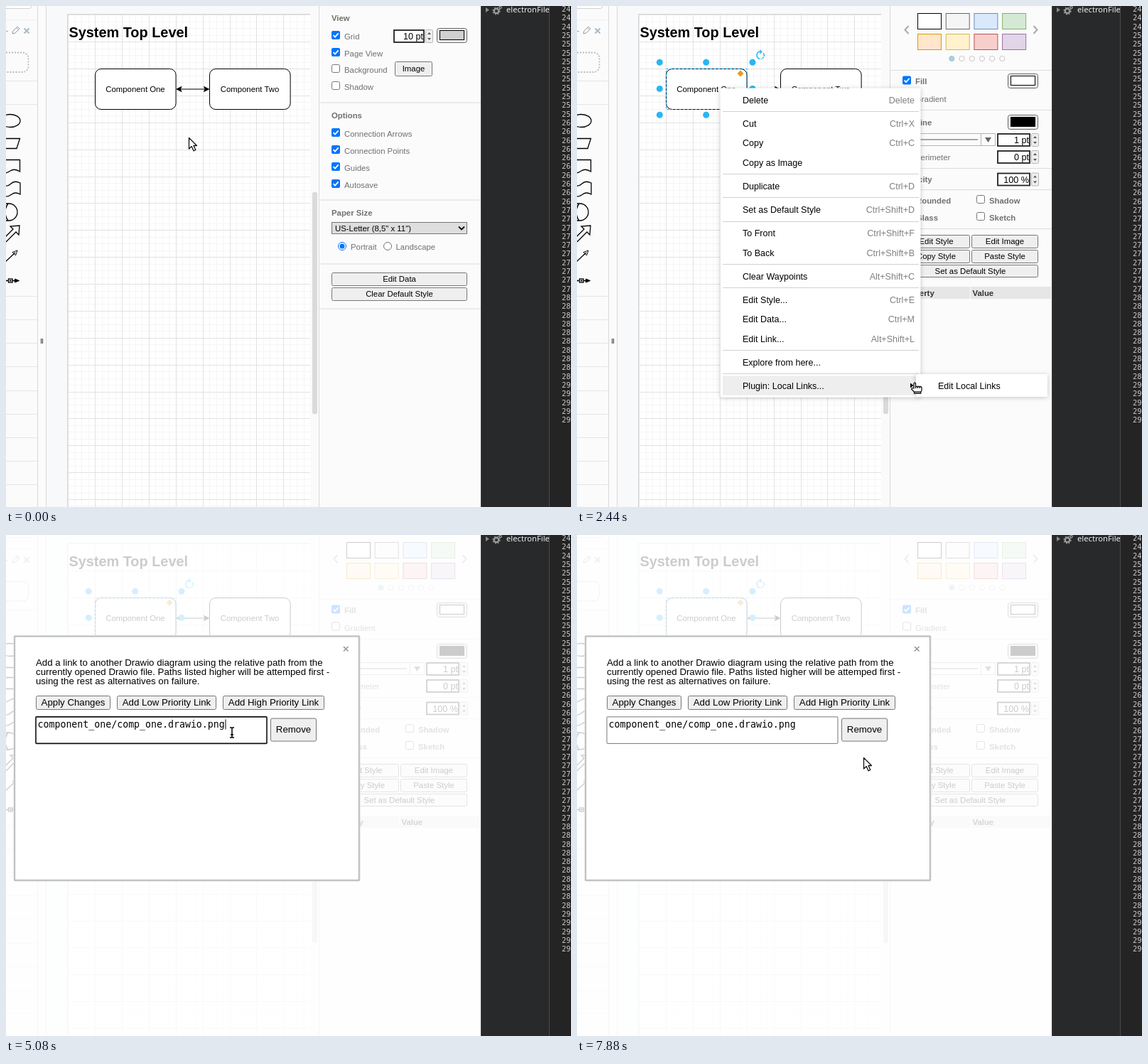
Animation of 795x705 px, one loop 8000 ms. Source, as an HTML page:

```html
<!DOCTYPE html>
<html lang="en">
<head>
<meta charset="utf-8">
<title>Local links</title>
<style>
  html, body { margin: 0; width: 100%; height: 100%; overflow: hidden; background: #fff; }
  svg { display: block; }
  text { font-family: "Liberation Sans", Arial, sans-serif; white-space: pre; }
  .mono { font-family: "DejaVu Sans Mono", monospace; }
  .ui { font-family: "Noto Sans", sans-serif; }
  .popup { filter: drop-shadow(0 1px 3px rgba(0, 0, 0, .22)); }
</style>
</head>
<body>
<svg id="stage" width="795" height="705" viewBox="0 0 795 705"></svg>
<script>
const LOOP = 8000, SMALL = 11.36, MENU = 12.52, INPUT = 12.6, BIG = 13.26, GREY = '#707070';

// Drawing helpers
const text = (x, y, s, o = {}) =>
  `<text x="${x}" y="${y}" font-size="${o.size || SMALL}" fill="${o.fill || '#000'}" class="${o.cls || ''}"
    font-weight="${o.bold ? 700 : 400}" text-anchor="${o.anchor || 'start'}">${s}</text>`;
const label = (x, y, s, bold) => text(x, y, s, { fill: GREY, bold });
const rect = (x, y, w, h, fill, stroke = 'none', r = 0, extra = '') =>
  `<rect x="${x}" y="${y}" width="${w}" height="${h}" fill="${fill}" stroke="${stroke}" rx="${r}" ${extra}/>`;
const path = (d, stroke = '#000', fill = 'none', extra = '') =>
  `<path d="${d}" stroke="${stroke}" fill="${fill}" ${extra}/>`;
const circle = (x, y, r, fill, stroke = 'none', extra = '') =>
  `<circle cx="${x}" cy="${y}" r="${r}" fill="${fill}" stroke="${stroke}" ${extra}/>`;
const group = (id, body) => `<g id="${id}">${body}</g>`;
const rule = y => path(`M441 ${y + .5}H668`, '#dcdcdc');
const check = (x, y, on) => on
  ? rect(x - 6, y - 6, 12, 12, '#0075ff', 'none', 2) + path(`M${x - 3.5} ${y}l2.5 2.7l4.7 -5.4`, '#fff', 'none', 'stroke-width="1.8"')
  : rect(x - 5.5, y - 5.5, 11, 11, '#fff', '#767676', 2);
const button = (x, y, w, h, s, size = SMALL) =>
  rect(x + .5, y + .5, w, h, '#efefef', '#767676', 2) +
  text(x + w / 2 + .5, y + h / 2 + size * .36, s, { size, anchor: 'middle' });
const spinner = (x, y, w, s) =>
  rect(x + 1, y + 1, w - 2, 17, '#fff', '#222', 0, 'stroke-width="1.8"') +
  text(x + w - 2, y + 14, s, { size: INPUT, anchor: 'end' }) +
  rect(x + w + 1.5, y + .5, 10, 18, '#efefef', '#b8b8b8', 1) +
  path(`M${x + w + 4} ${y + 7}l2.5 -3l2.5 3zM${x + w + 4} ${y + 12}l2.5 3l2.5 -3z`, 'none', '#555');
const swatchButton = (y, fill) =>
  rect(606.5, y + .5, 42, 20, '#efefef', '#666', 3) + rect(610.5, y + 3.5, 34, 13, fill, '#000');

function sidebar() {
  const ink = 'stroke-width="1.3"', line = d => path(d, '#000', 'none', ink);
  let s = rect(0, 0, 57, 705, '#fbfbfb') + path('M44.5 0V705M56.5 0V705', '#dadada');
  s += path('M-5 3.5H32Q36 3.5 36 -1', '#d0d0d0', '#fff') + path('M0 19.5H44', '#eee');
  s += path('M-3 35.5H3', '#aaa');
  s += path('M9 39l1 -4l6 -6l3 3l-6 6zM14.5 30.5l3 3', '#999');
  s += path('M25.5 31.5l7 7m0 -7l-7 7', '#a5bccb', 'none', 'stroke-width="2"');
  s += rect(-20, 65.5, 51.5, 27.5, 'none', '#bbb', 8, 'stroke-width="1.8" stroke-dasharray="2 2"');
  for (const y of [105, 138, 408, 441, 474, 507, 541, 574, 607, 640, 673]) s += path(`M0 ${y + .5}H44`, '#e5e5e5');
  s += path('M49.5 468v7M51.5 468v7', '#333');
  s += `<ellipse cx="6" cy="161.5" rx="14" ry="9" fill="none" stroke="#000" ${ink}/>`;
  s += line('M-2 186.5H19.5L15 200.5H-2') + line('M-2 216.5H19.5V233Q12 228 6 232T-4 235');
  s += line('M-4 252Q2 255 7 250T20 249V265Q13 261 8 265T-4 268');
  s += line('M-2 278H4A12 12 0 0 1 4 302H-2M3 278A20 20 0 0 0 3 302');
  s += line('M-3 327L10 314L6 310L19 309L18 322L14 318L0 332');
  s += line('M-2 361L13 347') + path('M16 344l-7 2.5l4.5 4.5z');
  s += path('M0 386.5H15', '#000', 'none', 'stroke-width="1.6"') + rect(3.5, 384, 5.5, 5, '#fff', '#000', 0, ink);
  return s + rect(5, 385.5, 2.5, 2, '#000') + path('M18.5 386.5l-6 -2.5v5z', '#000', '#000');
}

function canvas() {
  const step = 9.467, x0 = 87.3, y0 = 12.4;
  let minor = '', major = '';
  for (let i = 0; i < 74; i++) {
    const x = Math.round(x0 + i * step) + .5, y = Math.round(y0 + i * step) + .5;
    const d = `M87 ${y}H428` + (x < 428 ? `M${x} 12V705` : '');
    i % 4 ? minor += d : major += d;
  }
  const box = (x, s) => rect(x, 88.5, 113.6, 57, '#fff', '#000', 8.5) + text(x + 56.5, 121, s, { anchor: 'middle' });
  return rect(57, 0, 383, 705, '#f8f9fa') + rect(86.5, 11.5, 345, 700, '#fff', '#d8d8d8') +
    path(minor, '#f5f5f5') + path(major, '#e2e2e2') +
    text(88.4, 44, 'System Top Level', { size: 19.9, bold: true }) +
    box(125.5, 'Component One') + box(286.5, 'Component Two') +
    path('M244 117H282') + path('M240 117l7 -3.5l-1.7 3.5l1.7 3.5zM285.5 117l-7 -3.5l1.7 3.5l-1.7 3.5z', '#000', '#000') +
    rect(428, 0, 12, 705, '#fafafa') + rect(431, 262, 7, 312, '#d9dadc', 'none', 2);
}

function selection() {
  const blue = '#29b6f2';
  let s = rect(125.5, 88.5, 113.6, 57, 'none', '#00a8ff', 0, 'stroke-dasharray="2.8 2.8"');
  for (const x of [116.3, 181.7, 247]) for (const y of [79.2, 116.4, 153.3])
    if (x !== 181.7 || y !== 116.4) s += circle(x, y, 4.5, blue);
  s += path('M257.3 64.1A5.3 5.3 0 0 0 257.3 74.5', blue, 'none', 'stroke-width="1.5"');
  s += path('M263.2 68.5A5.3 5.3 0 0 1 258.7 74.5M263.2 68.5A5.3 5.3 0 0 0 262 66', blue, 'none', 'stroke-width="1.5" stroke-dasharray="2.5 1"');
  s += path('M257.3 61l3.5 3.5l-3.5 3.3z', 'none', blue);
  return s + path('M230 90.5l4.5 4.5l-4.5 4.5l-4.5 -4.5z', 'none', '#e69b1f');
}

function viewPanel() {
  let s = label(458, 21, 'View', 1);
  [['Grid', 41, 1], ['Page View', 65, 1], ['Background', 88, 0], ['Shadow', 112, 0],
   ['Connection Arrows', 178, 1], ['Connection Points', 202, 1], ['Guides', 226, 1], ['Autosave', 250, 1]]
    .forEach(([n, y, on]) => s += check(464, y, on) + label(476, y + 6.2, n));
  s += spinner(545, 33, 44, '10 pt') + swatchButton(31, '#d0d0d0') + button(547, 78, 52, 20, 'Image');
  s += [136, 273, 363, 426].map(y => rule(y - .5)).join('');
  s += label(458, 158, 'Options', 1) + label(458, 295, 'Paper Size', 1);
  s += rect(458.5, 304.5, 190, 16, '#dedede', '#767676') + text(463, 316.5, 'US-Letter (8,5" x 11")');
  s += path('M637 310.5l4 4l4 -4', '#000', 'none', 'stroke-width="1.8"');
  s += circle(473, 338, 5.5, '#fff', '#0075ff') + circle(473, 338, 3.5, '#0075ff') + label(485, 343, 'Portrait');
  s += circle(537, 338, 5.5, '#fff', '#767676') + label(548.5, 343, 'Landscape');
  return s + button(458, 375, 190, 18, 'Edit Data') + button(458, 396, 190, 18, 'Clear Default Style');
}

function stylePanel() {
  const tones = ['#fff #000', '#f5f5f5 #666', '#dae8fc #6c8ebf', '#d5e8d4 #82b366',
    '#ffe6cc #d79b00', '#fff2cc #d6b656', '#f8cecc #b85450', '#e1d5e7 #9673a6'];
  let s = tones.map((t, i) => rect(479.5 + i % 4 * 39.7, i < 4 ? 10.5 : 39.5, 33, 22, ...t.split(' '))).join('');
  s += path('M466.5 28l-5 5.5l5 5.5M642.5 28l5 5.5l-5 5.5', '#aaa', 'none', 'stroke-width="2"');
  for (let i = 0; i < 6; i++) s += circle(527.3 + i * 14.2, 74, 3.6, i ? '#fff' : '#a8d0e2', i ? '#c4c4c4' : '#9cc4d6');
  s += [90, 146, 228, 258, 313].map(rule).join('');
  s += check(464, 104.5, 1) + label(476, 110, 'Fill', 1) + swatchButton(95, '#fff');
  s += check(464, 128.5, 0) + label(476, 134.5, 'Gradient');
  s += check(464, 163, 1) + label(476, 168, 'Line', 1) + swatchButton(153, '#000');
  s += rect(458.5, 179.5, 130, 17, '#fbfbfb', '#b5b5b5') + path('M463 188H564', '#555') + path('M568.5 180V196', '#b5b5b5');
  s += path('M574 185h9l-4.5 7z', 'none', '#666');
  s += spinner(591, 179, 47, '1 pt') + spinner(591, 203, 47, '0 pt') + spinner(591, 234.5, 47, '100 %');
  s += label(476, 217, 'Perimeter') + label(458, 247.5, 'Opacity', 1);
  [['Rounded', 464, 272], ['Shadow', 568, 272], ['Glass', 464, 296], ['Sketch', 568, 296]]
    .forEach(([n, x, y]) => s += check(x, y, 0) + label(x + (x < 500 ? 13 : 12), y + 6, n, 1));
  s += button(458, 322, 94, 18, 'Edit Style') + button(555, 322, 93, 18, 'Edit Image');
  s += button(458, 343, 94, 18, 'Copy Style') + button(555, 343, 93, 18, 'Paste Style');
  s += button(458, 364, 190, 17, 'Set as Default Style');
  s += rect(441, 395, 226, 17, '#e6e6e6') + path('M553.5 395V412', '#fbfbfb');
  return s + text(456, 407.5, 'Property', { bold: 1, fill: '#333' }) + text(556.5, 407.5, 'Value', { bold: 1, fill: '#333' });
}

function devtools() {
  const icon = '#9a9a9a';
  let s = rect(668, 0, 127, 705, '#28292b') + rect(764, 0, 31, 705, '#242424') +
    path('M764.5 0V705', '#4a4a4d') + path('M668.5 0V705', '#3a3a3c');
  s += path('M675 2l5 3.5l-5 3.5z', 'none', '#8a8a8a');
  s += circle(690, 7, 3.2, 'none', icon, 'stroke-width="2.2"') +
    circle(690, 7, 4.8, 'none', icon, 'stroke-width="1.6" stroke-dasharray="1.9 1.87"');
  s += circle(695.5, 2, 1.6, 'none', icon, 'stroke-width="1.4"');
  s += `<svg width="764" height="20">${text(704, 9, 'electronFile', { size: 11.2, fill: '#e8eaed', cls: 'ui' })}</svg>`;
  for (let i = 0; i < 48; i++)
    s += text(782, 8 + i * 12.3, 247 + i, { size: 10.42, fill: '#c9c9c9', cls: 'mono' });
  return s;
}

const items = [[132, 'Delete', 'Delete'], [165, 'Cut', 'Ctrl+X'], [192.5, 'Copy', 'Ctrl+C'], [220, 'Copy as Image', ''],
  [253, 'Duplicate', 'Ctrl+D'], [286, 'Set as Default Style', 'Ctrl+Shift+D'], [319.5, 'To Front', 'Ctrl+Shift+F'],
  [347, 'To Back', 'Ctrl+Shift+B'], [380, 'Clear Waypoints', 'Alt+Shift+C'], [413, 'Edit Style...', 'Ctrl+E'],
  [440.5, 'Edit Data...', 'Ctrl+M'], [468, 'Edit Link...', 'Alt+Shift+L'], [501, 'Explore from here...', ''],
  [534, 'Plugin: Local Links...', '']];

function menu() {
  let s = rect(201.5, 115.5, 282, 435, '#fff', 'none', 2, 'class="popup"') +
    rect(205, 118, 74, 27.5, '#eee', 'none', 0, 'id="trail"') + rect(205, 0, 273, 27.5, '#eee', 'none', 0, 'id="rowHi"');
  items.forEach(([y, name, key], i) => {
    s += text(233, y + 4.5, name, { size: MENU }) + text(475, y + 4.5, key, { size: MENU, fill: '#808080', anchor: 'end' });
    if (i && y - items[i - 1][0] > 30) s += path(`M205 ${Math.round(y - 17) + .5}H481`, '#d0d0d0');
  });
  return s + path('M469 530.5l4.5 3.5l-4.5 3.5z', 'none', '#000');
}

const submenu = () => rect(477, 518, 185, 32, '#fff', 'none', 1, 'class="popup"') +
  rect(480, 520.5, 179, 27, '#eee', 'none', 0, 'id="subHi"') + text(508, 538.5, 'Edit Local Links', { size: MENU });

const ROW = 42.6;
const buttons = [[42, 226, 104, 19, 'Apply Changes'], [156, 226, 139, 19, 'Add Low Priority Link'],
  [305, 226, 142, 19, 'Add High Priority Link'], ...[0, 1, 2].map(i => [372, 257.6 + i * ROW, 64, 32, 'Remove'])];

function dialog() {
  let s = rect(11.5, 142, 486, 344.5, '#d5d5d5', '#d5d5d5', 1, 'stroke-width="2"') + rect(12.5, 143, 484, 342.5, '#fff', '#acacac');
  s += path('M475 157l6.5 6.5m0 -6.5l-6.5 6.5', '#999', 'none', 'stroke-width="1.7"');
  ['Add a link to another Drawio diagram using the relative path from the',
   'currently opened Drawio file. Paths listed higher will be attemped first -',
   'using the rest as alternatives on failure.'].forEach((l, i) => s += text(42, 183.6 + i * 13.3, l, { size: BIG }));
  const btn = i => group('btn' + i, button(...buttons[i], BIG));
  s += btn(0) + btn(1) + btn(2);
  for (let i = 0; i < 3; i++) {
    const y = 255.9 + i * ROW;
    s += group('row' + i, rect(42, y, 325, 37.5, '#fff', '#767676', 1, `id="field${i}"`) +
      text(44.5, y + 15, '', { size: BIG, cls: 'mono' }) + btn(i + 3));
  }
  return s + path('M45.5 259.5v14', '#000', 'none', 'id="caret"');
}

function cursors() {
  const w = 'stroke-width="1.3" stroke-linejoin="round"';
  const beam = 'M-3 -7H-1Q0 -7 0 -6V6Q0 7 -1 7H-3M3 -7H1Q0 -7 0 -6M0 6Q0 7 1 7H3M-2 3H2';
  return group('arrow', path('M.5 .5V16L4.2 12.6L7 18.8L9.8 17.5L7 11.5H11.5Z', '#111', '#fff', w)) +
    group('hand', path('M-1 8V1Q.2 -.8 1.5 1V5.5H8Q10 5.5 10 8V11L8.8 13V15H-.5V13L-4.3 9.2Q-4 6.8 -1 8Z' +
      'M1.5 5.500V8M4.3 5.5V8M7 5.5V8M-.5 12.8H8.8', '#111', '#fff', w)) +
    group('beam', path(beam, '#fff', 'none', 'stroke-width="3.6"') + path(beam, '#000', 'none', 'stroke-width="1.5"'));
}

const stage = document.getElementById('stage');
stage.innerHTML = canvas() + sidebar() + rect(440, 0, 228, 705, '#fbfbfb') + path('M440.5 0V705', '#d8d8d8') +
  group('view', viewPanel()) + group('style', stylePanel()) + group('select', selection()) +
  group('fade', rect(0, 0, 668, 705, '#fff', 'none', 0, 'opacity=".8"')) + devtools() +
  group('menu', menu()) + group('submenu', submenu()) + group('dialog', dialog()) + cursors();

const el = {};
stage.querySelectorAll('[id]').forEach(e => el[e.id] = e);
const show = (id, on) => el[id].style.display = on ? '' : 'none';

// Pointer hot spot: time, x, y
const track = [[0, 257, 185], [60, 257, 185], [360, 202, 116], [790, 202, 116], [960, 229, 236], [1250, 258, 410],
  [1580, 272, 531], [1740, 275, 534], [1940, 275, 534], [2600, 523, 529], [3210, 523, 529], [3970, 327, 306],
  [4110, 323.5, 289], [4350, 318, 278], [5080, 318, 278], [5560, 272, 236], [5760, 272, 236], [6130, 375, 234],
  [6610, 375, 234], [6980, 403, 273], [7270, 403, 273], [7640, 403, 313], [8000, 403, 313]];
const shapes = [[0, 'arrow'], [590, 'hand'], [2740, 'arrow'], [4030, 'beam'], [5200, 'arrow']];
const link = 'component_one/comp_one.drawio.png';
const lists = [[0, ['']], [4680, [link]], [5560, [link, '']], [6150, ['', link, '']], [7030, [link, '']], [7820, [link]]];

const latest = (table, t) => table.filter(r => r[0] <= t).pop()[1];

function pointer(t) {
  let i = 1;
  while (i < track.length - 1 && track[i][0] <= t) i++;
  const [t0, x0, y0] = track[i - 1], [t1, x1, y1] = track[i];
  const k = (t - t0) / (t1 - t0), e = .5 * k + .5 * k * k * (3 - 2 * k);
  return [x0 + (x1 - x0) * e, y0 + (y1 - y0) * e];
}

function draw(t) {
  const [x, y] = pointer(t), shape = latest(shapes, t), rows = latest(lists, t);
  const picked = t >= 480, modal = t >= 2740, menuOn = t >= 560 && !modal, sub = t >= 1570 && !modal;
  show('view', !picked); show('style', picked); show('select', picked);
  show('fade', modal); show('dialog', modal); show('menu', menuOn); show('submenu', sub);

  const hit = menuOn && x > 204 && x < 478 && items.find(r => Math.abs(r[0] - y) < 13.8);
  show('rowHi', hit);
  if (hit) el.rowHi.setAttribute('y', hit[0] - 13.7);
  show('trail', t > 800 && t < 1020);
  show('subHi', x >= 478);

  const focus = t >= 4200 && t < 5500;
  show('caret', focus);
  el.caret.setAttribute('transform', `translate(${rows[0] ? 263.5 : 0} 0)`);
  el.field0.setAttribute('stroke', focus ? '#101010' : '#767676');
  el.field0.setAttribute('stroke-width', focus ? 1.6 : 1);
  for (let i = 0; i < 3; i++) {
    show('row' + i, i < rows.length);
    el['row' + i].querySelector('text').textContent = rows[i] || '';
  }
  buttons.forEach(([bx, by, w, h], i) => {
    const over = modal && shape === 'arrow' && x >= bx && x <= bx + w && y >= by && y <= by + h;
    const r = el['btn' + i].firstElementChild;
    r.setAttribute('fill', over ? '#e0e0e1' : '#efefef');
    r.setAttribute('stroke', over ? '#454545' : '#767676');
  });

  for (const id of ['arrow', 'hand', 'beam']) show(id, id === shape);
  el[shape].setAttribute('transform', `translate(${x.toFixed(1)} ${y.toFixed(1)})`);
}

const start = performance.now();
(function frame() {
  draw((performance.now() - start) % LOOP);
  requestAnimationFrame(frame);
})();
</script>
</body>
</html>
```
